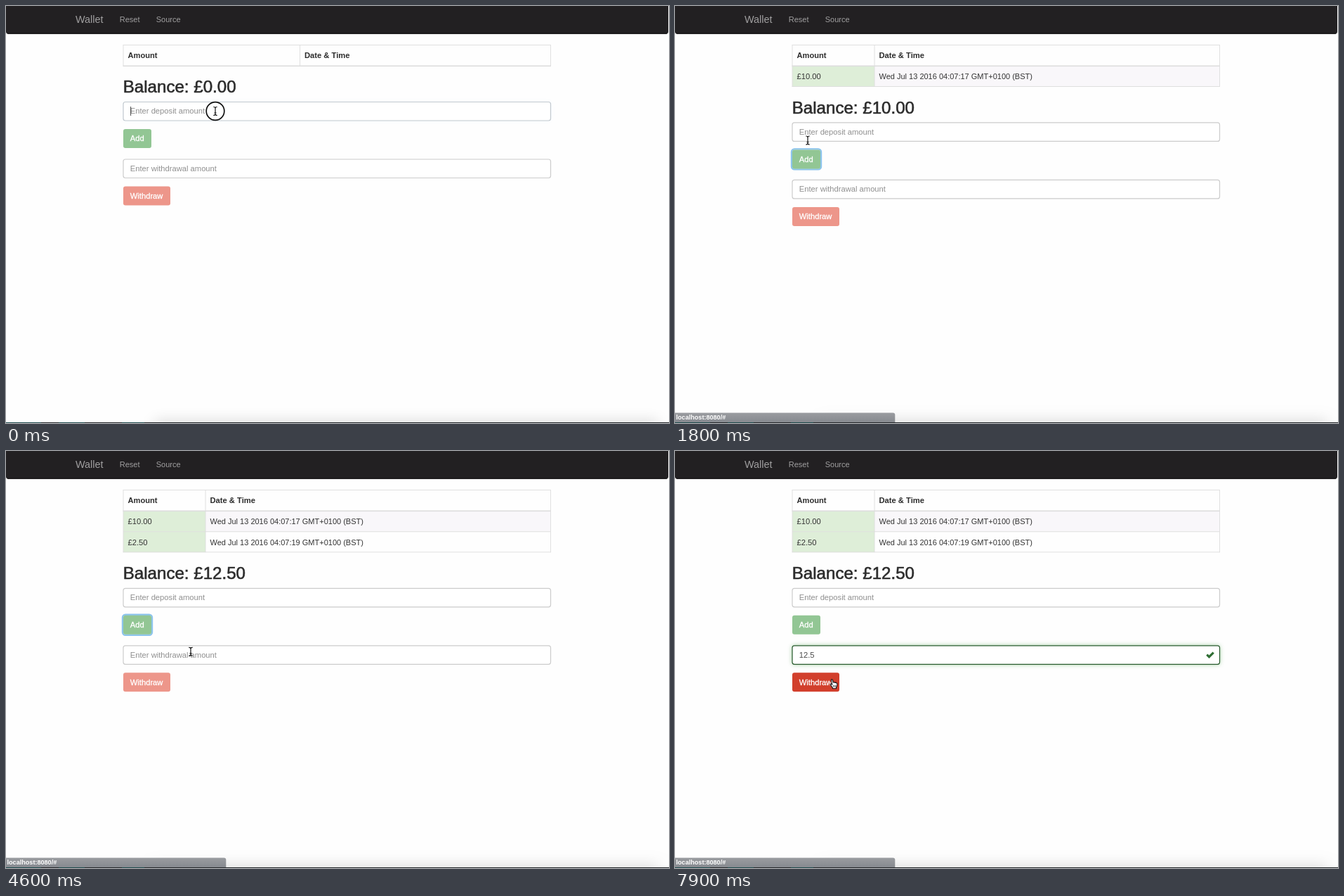
An HTML page with a canvas for the animation above (8 s loop, 944 px wide and 593 px high).

```html
<!DOCTYPE html>
<html lang="en">
<head>
<meta charset="utf-8">
<title>Wallet</title>
<style>
html, body { margin: 0; width: 100%; height: 100%; overflow: hidden; background: #fefefe; }
canvas { display: block; width: 944px; height: 593px; }
</style>
</head>
<body>
<canvas id="stage" width="944" height="593"></canvas>
<script>
const ctx = document.getElementById('stage').getContext('2d');
const LOOP = 8000;
const FONT = '"Liberation Sans", Arial, sans-serif';
const LEFT = 167, WIDTH = 608.5, ROW = 29.4;

const DEPOSITS = [
  { amount: '£10.00', date: 'Wed Jul 13 2016 04:07:17 GMT+0100 (BST)' },
  { amount: '£2.50', date: 'Wed Jul 13 2016 04:07:19 GMT+0100 (BST)' }
];
const BALANCES = ['£0.00', '£10.00', '£12.50'];

const START = { rows: 0, focus: 'deposit', deposit: '', withdraw: '', status: false, blink: 0 };
const EVENTS = [
  [500, { deposit: '1' }],
  [700, { deposit: '10' }],
  [1650, { deposit: '', rows: 1, focus: 'add' }],
  [1700, { status: true }],
  [2250, { status: false }],
  [2300, { focus: 'deposit' }],
  [2800, { deposit: '2' }],
  [2950, { deposit: '2.' }],
  [3100, { deposit: '2.5' }],
  [3250, { deposit: '2.50' }],
  [3600, { status: true }],
  [4100, { deposit: '', rows: 2, focus: 'add' }],
  [4900, { status: false }],
  [4950, { focus: 'withdraw' }],
  [6530, { withdraw: '1' }],
  [6720, { withdraw: '12' }],
  [6900, { withdraw: '12.' }],
  [7100, { withdraw: '12.5' }],
  [7800, { status: true }]
];

const PATH = [
  [0, 298, 149.5], [950, 298, 149.5], [1300, 189, 191], [1800, 189, 191],
  [2150, 219, 180], [3300, 219, 180], [3650, 169, 217], [4200, 169, 217],
  [4550, 263, 285], [4800, 263, 288], [7250, 263, 288], [7650, 224, 325]
];
const HIDDEN = [[500, 950], [2800, 3300], [6530, 7250]];
const CLICKS = [0, 1600, 2300, 4050, 4950];

const PLAIN = { border: [204, 204, 204], glow: [102, 175, 233, 0] };
const BLUE = { border: [102, 175, 233], glow: [102, 175, 233, 0.65] };
const GREEN = { border: [43, 92, 48], glow: [103, 177, 104, 0.7] };
const VALID = { border: [60, 118, 61], glow: [103, 177, 104, 0] };

function stateAt(t) {
  const s = { ...START };
  for (const [at, change] of EVENTS) {
    if (at > t) break;
    Object.assign(s, change);
    if (!('status' in change)) s.blink = at;
  }
  return s;
}

function inputStyle(name, t) {
  if (t < 0) return PLAIN;
  const s = stateAt(t), focused = s.focus === name;
  if (s[name]) return focused ? GREEN : VALID;
  return focused ? BLUE : PLAIN;
}

// Averaging the recent past gives a linear 150 ms transition.
function easedStyle(name, t) {
  const n = 10, out = { border: [0, 0, 0], glow: [0, 0, 0, 0] };
  for (let i = 0; i < n; i++) {
    const style = inputStyle(name, t - i * 15);
    for (const key of ['border', 'glow']) style[key].forEach((v, k) => out[key][k] += v / n);
  }
  return out;
}

function cursorAt(t) {
  let i = 0;
  while (i < PATH.length - 1 && PATH[i + 1][0] <= t) i++;
  const a = PATH[i], b = PATH[i + 1] || a;
  const p = b === a ? 0 : (t - a[0]) / (b[0] - a[0]);
  const k = p * p * (3 - 2 * p);
  return { x: a[1] + (b[1] - a[1]) * k, y: a[2] + (b[2] - a[2]) * k };
}

function layout(rows) {
  const dy = rows * ROW;
  return {
    title: 123.3 + dy,
    deposit: { x: LEFT, y: 136.5 + dy, w: WIDTH, h: 26.5 },
    add: { x: LEFT, y: 175 + dy, w: 40, h: 27 },
    withdraw: { x: LEFT, y: 218 + dy, w: WIDTH, h: 26.5 },
    take: { x: LEFT, y: 256.5 + dy, w: 67, h: 27 }
  };
}

const inside = (p, r) => p.x >= r.x && p.x <= r.x + r.w && p.y >= r.y && p.y <= r.y + r.h;
const rgb = c => `rgb(${c.map(Math.round).join(',')})`;

function text(str, x, y, size, color, { bold = false, thick = 0 } = {}) {
  ctx.font = `${bold ? 'bold ' : ''}${size}px ${FONT}`;
  ctx.fillStyle = color;
  ctx.fillText(str, x, y);
  if (thick) {
    ctx.strokeStyle = color;
    ctx.lineWidth = thick;
    ctx.strokeText(str, x, y);
  }
}

function rect(x, y, w, h, color) {
  ctx.fillStyle = color;
  ctx.fillRect(x, y, w, h);
}

function rounded(r, radius, grow = 0) {
  ctx.beginPath();
  ctx.roundRect(r.x - grow, r.y - grow, r.w + 2 * grow, r.h + 2 * grow, radius);
}

function poly(points) {
  ctx.beginPath();
  points.forEach(([x, y]) => ctx.lineTo(x, y));
  ctx.closePath();
}

function drawNav() {
  ctx.beginPath();
  ctx.roundRect(0, -5, 943, 44.7, 3.5);
  ctx.fillStyle = '#222022';
  ctx.fill();
  rect(2, 38.6, 939, 1, '#0c0b0c');
  text('Wallet', 99, 23.8, 14.4, '#a09fa0');
  text('Reset', 161.7, 23, 11, '#a09fa0');
  text('Source', 213.7, 23, 11, '#a09fa0');
}

function drawTable(rows) {
  const split = rows ? 284 : 418.5, top = 55.5, head = 85.3;
  const bottom = head + rows * ROW, line = '#dddddd';
  for (let i = 0; i < rows; i++) {
    const y = head + i * ROW;
    rect(LEFT, y, split - LEFT, ROW, '#deeed8');
    if (i % 2 === 0) rect(split, y, LEFT + WIDTH - split, ROW, '#f9f7fa');
    if (i) rect(LEFT, y - 0.4, WIDTH, 0.9, line);
    text(DEPOSITS[i].amount, 173.5, y + 19, 11.2, '#333');
    text(DEPOSITS[i].date, 290.5, y + 19, 11, '#333');
  }
  text('Amount', 173.5, 74.3, 11.1, '#2c2c2c', { bold: true });
  text('Date & Time', split + 6.5, 74.3, 11.2, '#2c2c2c', { bold: true });
  rect(LEFT - 0.5, top - 0.4, WIDTH + 1, 0.9, line);
  rect(LEFT - 0.5, head - 0.8, WIDTH + 1, 1.6, line);
  if (rows) rect(LEFT - 0.5, bottom - 0.7, WIDTH + 1, 0.9, line);
  for (const x of [LEFT - 0.4, split - 0.4, LEFT + WIDTH - 0.4]) {
    rect(x, top, 0.9, bottom - top, line);
  }
}

function drawCheck(x, y) {
  poly([[x - 5.8, y + 0.6], [x - 3.6, y - 1.7], [x - 1.5, y + 0.3],
    [x + 3.6, y - 4.6], [x + 5.8, y - 2.4], [x - 1.5, y + 4.9]]);
  ctx.fillStyle = '#2f6e33';
  ctx.fill();
}

function drawInput(name, r, s, t) {
  const style = easedStyle(name, t), glow = style.glow;
  ctx.save();
  if (glow[3] > 0.01) {
    ctx.shadowColor = `rgba(${glow.slice(0, 3).map(Math.round)},${glow[3]})`;
    ctx.shadowBlur = 6;
  }
  rounded(r, 3);
  ctx.fillStyle = '#fff';
  ctx.fill();
  ctx.restore();
  ctx.strokeStyle = rgb(style.border);
  ctx.lineWidth = 1.2;
  ctx.stroke();

  const value = s[name], base = r.y + 16.8;
  if (value) {
    text(value, 176.8, base, 11.2, '#4a4a4a');
    drawCheck(762, r.y + 13.3);
  } else {
    text(`Enter ${name === 'deposit' ? 'deposit' : 'withdrawal'} amount`, 176.8, base, 11.2, '#8f8f8f');
  }
  if (s.focus === name && (t - s.blink) % 1000 < 500) {
    ctx.font = `11.2px ${FONT}`;
    rect(177.2 + ctx.measureText(value).width, r.y + 6.5, 0.9, 13, '#333');
  }
}

function drawButton(r, label, color, focused) {
  if (focused) {
    rounded(r, 4, 1);
    ctx.strokeStyle = '#8cc4ec';
    ctx.lineWidth = 2.4;
    ctx.stroke();
  }
  rounded(r, 3);
  ctx.fillStyle = color;
  ctx.fill();
  text(label, 176.8, r.y + 17.2, 11.2, '#fff', { thick: 0.3 });
}

function drawFooter(status) {
  ctx.save();
  ctx.shadowColor = 'rgba(0,0,0,0.22)';
  ctx.shadowBlur = 20;
  rect(212, 592, 716, 10, '#333');
  ctx.restore();
  if (status) {
    const g = ctx.createLinearGradient(0, 579, 0, 592);
    g.addColorStop(0, '#999b9f');
    g.addColorStop(1, '#878a90');
    ctx.beginPath();
    ctx.roundRect(-4, 578.5, 317.3, 18, 3);
    ctx.fillStyle = g;
    ctx.fill();
    text('localhost:8080/#', 1.5, 588.2, 9.1, '#fff', { bold: true });
  }
  rect(0, 592, 944, 1, '#24282b');
  for (const [x, w] of [[0, 50], [75, 37], [165, 32]]) rect(x, 592, w, 1, '#1d4a4c');
}

function drawBeam() {
  const mark = () => {
    ctx.beginPath();
    ctx.moveTo(-2.7, -6);
    ctx.quadraticCurveTo(0, -6, 0, -4.3);
    ctx.quadraticCurveTo(0, -6, 2.7, -6);
    ctx.moveTo(0, -4.5);
    ctx.lineTo(0, 4.5);
    ctx.moveTo(-2.7, 6);
    ctx.quadraticCurveTo(0, 6, 0, 4.3);
    ctx.quadraticCurveTo(0, 6, 2.7, 6);
    ctx.moveTo(-1.5, 2.5);
    ctx.lineTo(1.5, 2.5);
    ctx.stroke();
  };
  ctx.strokeStyle = 'rgba(255,255,255,0.8)';
  ctx.lineWidth = 2.4;
  mark();
  ctx.strokeStyle = '#111';
  ctx.lineWidth = 1.2;
  mark();
}

function outlined(points) {
  poly(points);
  ctx.lineJoin = 'round';
  ctx.fillStyle = '#fff';
  ctx.fill();
  ctx.strokeStyle = '#111';
  ctx.lineWidth = 1.1;
  ctx.stroke();
}

function drawHand() {
  outlined([[-1.6, 0.2], [-0.6, -0.3], [0.4, 0.4], [1.4, 4.2], [2.6, 3.7], [3.6, 4.4],
    [4.8, 4.1], [5.6, 4.9], [6.6, 5], [7, 6.2], [6.6, 9.5], [5.6, 11], [5.6, 12.8],
    [0.6, 12.8], [0, 11], [-2.6, 7.6], [-2.8, 6.3], [-1.5, 6.2], [-0.2, 7.3]]);
  ctx.lineWidth = 0.7;
  ctx.beginPath();
  for (const x of [1.5, 3.2, 4.8]) {
    ctx.moveTo(x, 8);
    ctx.lineTo(x + 0.1, 10.8);
  }
  ctx.stroke();
}

function drawArrow() {
  poly([[0, 0], [0, 12], [2.8, 9.4], [4.6, 13.4], [6.5, 12.6], [4.7, 8.7], [8.4, 8.5]]);
  ctx.fillStyle = '#111';
  ctx.fill();
  ctx.strokeStyle = '#fff';
  ctx.lineWidth = 0.9;
  ctx.stroke();
}

function drawCursor(p, kind, clicked) {
  ctx.save();
  ctx.translate(p.x, p.y);
  ({ beam: drawBeam, hand: drawHand, arrow: drawArrow })[kind]();
  if (clicked) {
    ctx.beginPath();
    ctx.arc(0, 0, 12.8, 0, Math.PI * 2);
    ctx.strokeStyle = '#111';
    ctx.lineWidth = 1.7;
    ctx.stroke();
  }
  ctx.restore();
}

function draw(t) {
  const s = stateAt(t), box = layout(s.rows), p = cursorAt(t);
  const shown = !HIDDEN.some(([a, b]) => t >= a && t < b);
  const overAdd = shown && inside(p, box.add), overTake = shown && inside(p, box.take);

  rect(0, 0, 944, 593, '#fefefe');
  drawNav();
  drawTable(s.rows);
  text('Balance: ' + BALANCES[s.rows], 166.8, box.title, 24.1, '#2c2c2c', { thick: 0.6 });
  drawInput('deposit', box.deposit, s, t);
  drawButton(box.add, 'Add', !s.deposit ? '#92c694' : overAdd ? '#3b8d40' : '#57a75a', s.focus === 'add');
  drawInput('withdraw', box.withdraw, s, t);
  drawButton(box.take, 'Withdraw', !s.withdraw ? '#ed968a' : overTake ? '#d23f2c' : '#e45c4a', false);
  drawFooter(s.status);

  if (shown) {
    const overInput = inside(p, box.deposit) || inside(p, box.withdraw);
    const link = (overAdd && s.deposit) || (overTake && s.withdraw);
    const kind = overInput ? 'beam' : link ? 'hand' : 'arrow';
    drawCursor(p, kind, CLICKS.some(c => t >= c && t < c + 120));
  }
}

function tick(now) {
  draw(now % LOOP);
  requestAnimationFrame(tick);
}
requestAnimationFrame(tick);
</script>
</body>
</html>
```
